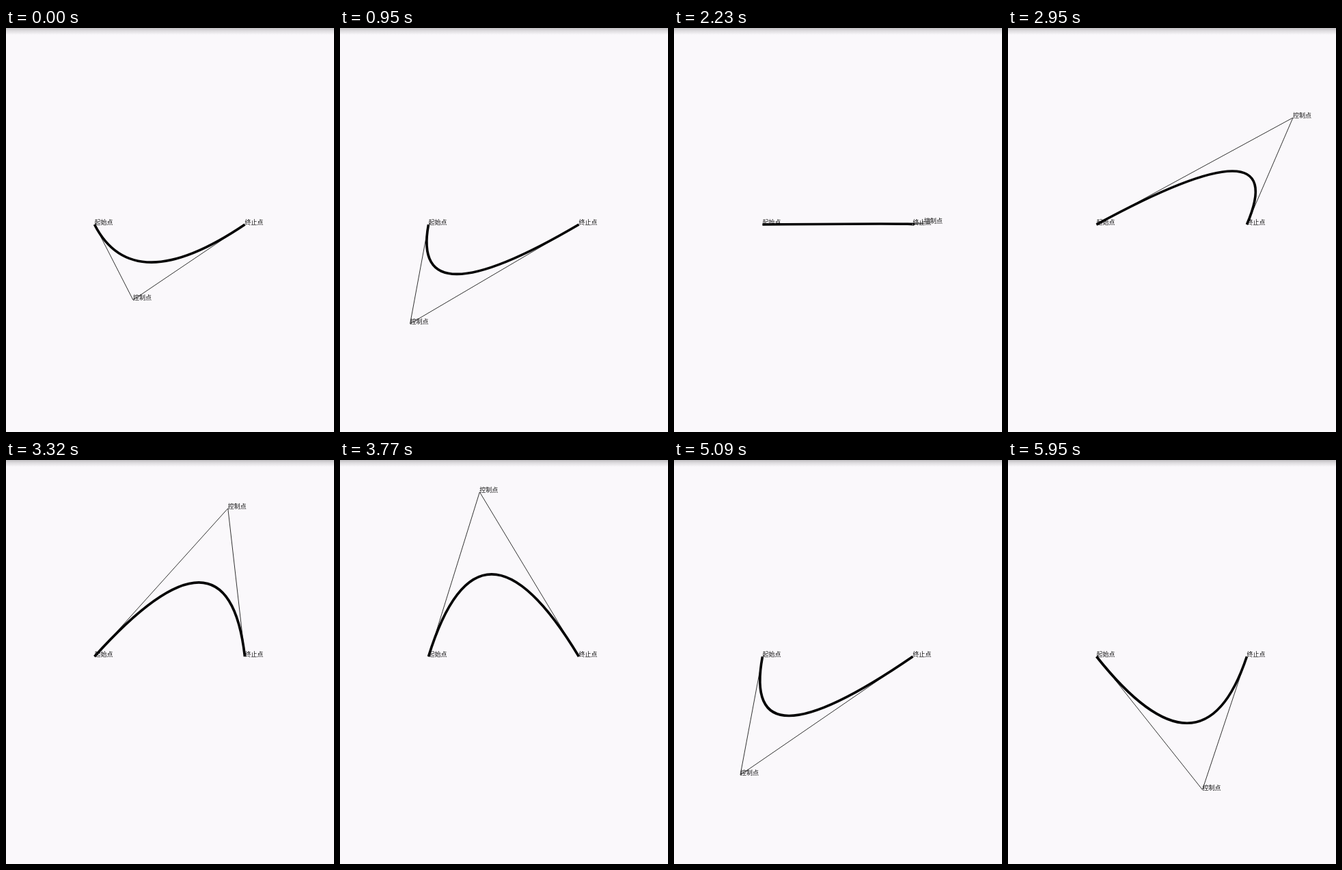
Write an HTML page with a canvas that moves like this. It is 480 by 590 pixels and loops after 8000 ms.

```html
<!DOCTYPE html>
<html lang="zh">
<head>
<meta charset="utf-8">
<style>
  html, body { margin: 0; height: 100%; overflow: hidden; background: #faf8fb; }
  canvas { display: block; }
</style>
</head>
<body>
<canvas id="stage" width="480" height="590"></canvas>
<script>
const ctx = document.getElementById('stage').getContext('2d');
const LOOP = 8000, FPS = 22, REST = 4;
const PAPER = '#faf8fb';
const start = [129.5, 287], end = [349.5, 287];

// Stops of the dragged control point: arrival tick, x, y.
const stops = [
  [6, 186, 397.2], [15, 79, 427], [25, 195, 437], [35, 273, 444],
  [51, 380, 255], [61, 417, 131], [75, 296, 61], [86, 143, 45],
  [94, 74, 60.5], [104, 73, 321], [112, 97, 460], [122, 200, 477], [131, 284.5, 481.5]
];

// Smooth curve from b to c, with a and d as neighbours.
function spline(a, b, c, d, p) {
  const bend = p * (1 - p) / 2;
  return b + (c - b) * p * p * (3 - 2 * p) + bend * ((1 - p) * (c - a) - p * (d - b));
}

// Each drag begins after a short rest and arrives at the next stop on time.
function controlAt(tick) {
  const next = stops.findIndex(stop => stop[0] > tick);
  if (next === 0) return stops[0].slice(1);
  if (next < 0) return stops.at(-1).slice(1);
  const b = stops[next - 1], c = stops[next];
  const a = stops[next - 2] || b, d = stops[next + 1] || c;
  const begin = b[0] + REST;
  const p = Math.max(0, (tick - begin) / (c[0] - begin));
  return [1, 2].map(axis => spline(a[axis], b[axis], c[axis], d[axis], p));
}

function strokePath(width, color, build) {
  ctx.beginPath();
  build();
  ctx.lineWidth = width;
  ctx.strokeStyle = color;
  ctx.stroke();
}

function drawShadow() {
  const shade = ctx.createLinearGradient(0, 0, 0, 10);
  shade.addColorStop(0, '#bfbdc0');
  shade.addColorStop(0.4, '#dddbde');
  shade.addColorStop(1, PAPER);
  ctx.fillStyle = shade;
  ctx.fillRect(0, 0, 480, 10);
}

function draw(ms) {
  // Hold each pose for one tick, with tick times rounded to 10 ms.
  const tick = Math.floor((Math.floor(ms / 10) * 10 + 5.5) * FPS / 1000);
  const control = controlAt(tick);

  ctx.fillStyle = PAPER;
  ctx.fillRect(0, 0, 480, 590);
  drawShadow();

  strokePath(1, '#333', () => {
    ctx.moveTo(...start);
    ctx.lineTo(...control);
    ctx.lineTo(...end);
  });
  strokePath(3.7, '#050505', () => {
    ctx.moveTo(...start);
    ctx.quadraticCurveTo(...control, ...end);
  });

  ctx.fillStyle = '#111';
  ctx.font = '500 9px "Noto Sans CJK SC", "Noto Sans CJK", sans-serif';
  ctx.fillText('起始点', ...start);
  ctx.fillText('终止点', ...end);
  ctx.fillText('控制点', ...control);
}

function frame() {
  draw(performance.now() % LOOP);
  requestAnimationFrame(frame);
}
frame();
</script>
</body>
</html>
```
